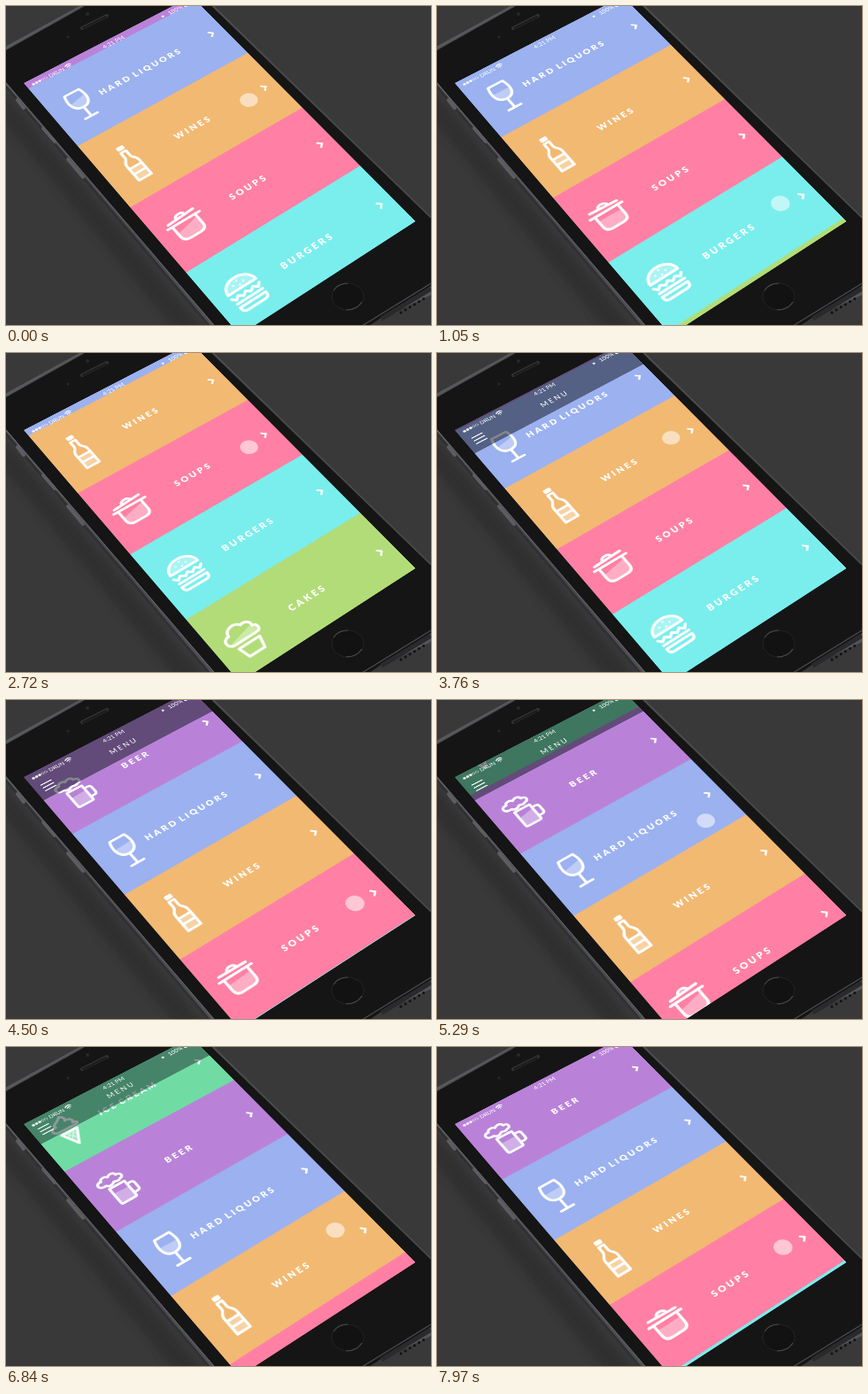
These frames come from a looping animation (480x360 px, 8 s). An HTML page:

```html
<!DOCTYPE html>
<html lang="en">
<head>
<meta charset="utf-8">
<title>Menu scroll</title>
<style>
  html, body { margin: 0; width: 100%; height: 100%; overflow: hidden; background: #393939; }
  #stage { position: relative; width: 480px; height: 360px; overflow: hidden; }
  #stage > svg { position: absolute; left: 0; top: 0; }
  #screen { position: absolute; left: 0; top: 0; width: 320px; height: 568px; transform-origin: 0 0; }
  #screen svg { position: absolute; left: -4px; top: -4px; }
  text { font-family: Lato, "Open Sans", sans-serif; fill: #fff; }
  .label { font-size: 15px; font-weight: 900; letter-spacing: 3.7px; word-spacing: -3px; text-anchor: middle; }
  .line { fill: none; stroke: #fff; stroke-width: 4.4; stroke-linecap: round; stroke-linejoin: round; }
  .tint { fill: #fff; fill-opacity: .35; stroke: none; }
</style>
</head>
<body>
<div id="stage">
  <svg width="480" height="360" viewBox="0 0 480 360">
    <defs>
      <linearGradient id="metal" x1="0" y1="0" x2="1" y2="1">
        <stop offset="0" stop-color="#5b5c60"/><stop offset=".5" stop-color="#48494d"/><stop offset="1" stop-color="#56575b"/>
      </linearGradient>
      <filter id="soft"><feGaussianBlur stdDeviation="5"/></filter>
    </defs>
    <rect width="480" height="360" fill="#393939"/>
    <path d="M-20 78L228 372H196L-20 110Z" fill="#222" opacity=".4" filter="url(#soft)"/>
    <path d="M-10 79L231 364H400L480 326V238L235 0H83L-10 51Z" fill="url(#metal)"/>
    <path d="M-10 75L240 366H402L480 316V239L233 0H88L-10 55Z" fill="#151515"/>
    <path d="M-10 79L234 366" stroke="#2f3033" stroke-width="2.5" fill="none"/>
    <path d="M-10 75L240 366" stroke="#6c6d72" stroke-width="1" fill="none"/>
    <path d="M88 0L-10 55M233 0L480 239M402 361L480 313" stroke="#4a4b4e" stroke-width="1.2" fill="none"/>
    <path d="M13 106L20 115M42 138L55 153M70 173L87 193" stroke="#5c5d62" stroke-width="4" stroke-linecap="round"/>
    <path d="M424 353L480 319" stroke="#2a2a2c" stroke-width="5"/>
    <path d="M446 346L474 329" stroke="#111" stroke-width="3" stroke-linecap="round" stroke-dasharray="0 6"/>
    <path d="M86 25L114 11" stroke="#333335" stroke-width="4" stroke-linecap="round"/>
    <path d="M87 25L113 12" stroke="#1c1c1e" stroke-width="2" stroke-linecap="round"/>
    <circle cx="92" cy="9" r="2" fill="#28282c"/>
    <circle cx="70" cy="35" r="1.5" fill="#29292d"/>
    <ellipse cx="386" cy="328" rx="18" ry="15" fill="#121212" stroke="#242426"/>
    <path d="M370 321Q375 313 386 313M384 343Q396 343 402 334" fill="none" stroke="#4a4a4d" stroke-width="1.2"/>
  </svg>
  <div id="screen"></div>
</div>
<script>
const W = 320, H = 568, ROW = H / 4, LOOP = 8000;
const UP = 720, DOWN = 860;
const screenEl = document.getElementById('screen');

// Perspective matrix that maps the W x H screen onto four stage points.
function project([x0, y0], [x1, y1], [x2, y2], [x3, y3]) {
  const sx = x0 - x1 + x2 - x3, sy = y0 - y1 + y2 - y3;
  const ax = x1 - x2, bx = x3 - x2, ay = y1 - y2, by = y3 - y2;
  const det = ax * by - bx * ay;
  const g = (sx * by - bx * sy) / det, h = (ax * sy - sx * ay) / det;
  const m = [
    (x1 - x0 + g * x1) / W, (y1 - y0 + g * y1) / W, 0, g / W,
    (x3 - x0 + h * x3) / H, (y3 - y0 + h * y3) / H, 0, h / H,
    0, 0, 1, 0, x0, y0, 0, 1
  ];
  return `matrix3d(${m.map(n => n.toFixed(9)).join()})`;
}
screenEl.style.transform = project([20, 87], [209.5, -11], [462.5, 243], [264, 371.5]);

const line = d => `<path class="line" d="${d}"/>`;
const tint = d => `<path class="tint" d="${d}"/>`;

// Outline holding a liquid whose surface tilts.
const vessel = (id, d, level) => `
  <clipPath id="${id}"><path d="${d}"/></clipPath>
  <g clip-path="url(#${id})"><rect class="tint liquid" x="-70" y="${level}" width="140" height="90" data-y="${level}"/></g>
  ${line(d)}`;

const icons = {
  cone: () => line('M-15 -4C-25 -5 -23 -17 -13 -16C-16 -24 -4 -23 2 -32C8 -28 9 -23 6 -20C16 -21 18 -13 14 -10C23 -9 21 -3 15 -4Z') +
    line('M-14 3H14L0 32Z') + tint('M-14 3H14L0 32Z') +
    '<path class="line" style="stroke-width:1.3;opacity:.7" d="M-8 4L5 20M0 4L8 14M8 4L-5 20M0 4L-8 14"/>',
  mug: () => line('M-17 -14C-27 -14 -26 -27 -16 -25C-14 -32 -5 -31 -3 -27C3 -32 10 -30 10 -24C19 -25 19 -14 11 -14C7 -10 3 -14 0 -14C-5 -9 -11 -10 -13 -14Z') +
    vessel('mugClip', 'M-13 -6H14V26Q14 29 11 29H-10Q-13 29 -13 26Z', 6) +
    line('M14 1H20Q25 1 25 6V16Q25 21 20 21H14'),
  glass: () => vessel('glassClip', 'M-13 -28H13C19 -9 15 7 0 7C-15 7 -19 -9 -13 -28Z', -11) + line('M0 7V29M-11 29H11'),
  bottle: () => line('M-4 -35H4V-31H-4Z') + vessel('bottleClip', 'M-4.5 -25H4.5V-13C5 -7 11 -7 11 2V34H-11V2C-11 -7 -5 -7 -4.5 -13Z', 7) +
    line('M-11 8H11M-11 20H11'),
  pot: () => vessel('potClip', 'M-20 -9H20V11Q20 22 9 22H-9Q-20 22 -20 11Z', 1) +
    line('M-28 -9H-20M20 -9H28') +
    `<g class="lid">${line('M-23 -17H23M-8 -18C-7 -25 7 -25 8 -18')}</g>`,
  burger: () => tint('M-24 -8C-23 -34 23 -34 24 -8Z') + line('M-24 -8C-23 -34 23 -34 24 -8Z') +
    '<path class="line" style="stroke-width:3.4" d="M-9 -17h0M0 -22h0M8 -16h0M0 -13h0"/>' +
    line('M-24 0L-19 5L-13 0L-6 5L0 0L6 5L13 0L19 5L24 0M-22 11H22M-22 18H22V20Q22 27 15 27H-15Q-22 27 -22 20Z'),
  cake: () => {
    const top = 'M-19 1C-31 0 -30 -16 -18 -16C-16 -30 2 -31 7 -22C16 -25 22 -18 20 -12C29 -10 27 1 19 1Z';
    return vessel('cakeClip', top, -9) + line('M-18 9H18L13 28H-13Z');
  }
};

const items = [
  ['ICE CREAM', '#70dca4', 'cone'],
  ['BEER', '#b982d8', 'mug'],
  ['HARD LIQUORS', '#9bb1f0', 'glass'],
  ['WINES', '#f2b972', 'bottle'],
  ['SOUPS', '#ff80a4', 'pot'],
  ['BURGERS', '#79eeed', 'burger'],
  ['CAKES', '#b2dc78', 'cake']
];

const MID = ROW / 2 + 4;
const rowMarkup = ([name, color, icon], i) => `
  <g transform="translate(0 ${i * ROW})">
    <rect width="${W}" height="${ROW + 1}" fill="${color}"/>
    <g transform="translate(49 ${MID})">${icons[icon]()}</g>
    <text class="label" x="${W / 2 + 1}" y="${MID + 4}">${name}</text>
    <path class="line" style="stroke-width:3.4;stroke-linecap:butt;stroke-linejoin:miter" d="M294 ${MID - 7}l6 6l-6 6"/>
  </g>`;

const dots = [0, 1, 2, 3, 4].map(i =>
  `<circle cx="${11 + i * 5.6}" cy="11" r="2.1" fill="${i < 3 ? '#fff' : 'none'}" stroke="#fff" stroke-width=".7"/>`).join('');

screenEl.innerHTML = `
<svg width="${W + 8}" height="${H + 8}" viewBox="-4 -4 ${W + 8} ${H + 8}">
  <clipPath id="display"><rect width="${W}" height="${H}"/></clipPath>
  <g clip-path="url(#display)">
    <g id="list">${items.map(rowMarkup).join('')}</g>
    <g id="nav">
      <rect y="-60" width="${W}" height="119" fill="#141923" fill-opacity=".52"/>
      <path class="line" style="stroke-width:2.2;stroke-linecap:butt" d="M12 30h20M12 37h20M12 44h20"/>
      <text x="161.5" y="42" font-size="13" letter-spacing="3" text-anchor="middle">MENU</text>
    </g>
    ${dots}
    <text x="39" y="15" font-size="9.5">DRUN</text>
    <path class="line" style="stroke-width:1.7" d="M70 9q5 -4 10 0M72 12q3 -2.5 6 0M75 14.5h0"/>
    <text x="160" y="14" font-size="10.5" text-anchor="middle">4:21 PM</text>
    <rect x="254" y="8" width="4" height="4" fill="#fff" opacity=".8"/>
    <text x="267" y="14" font-size="10.5">100%</text>
    <rect x="297" y="6.5" width="17" height="8" rx="1.5" fill="#fff"/>
    <circle id="touch" cx="${W * .82}" r="14" fill="#fff"/>
  </g>
</svg>`;

const list = document.getElementById('list');
const nav = document.getElementById('nav');
const touch = document.getElementById('touch');
const liquids = [...document.querySelectorAll('.liquid')];
const lid = document.querySelector('.lid');

// Start time, first row, last row.
const swipes = [
  [-572, 1, 2], [946, 2, 3], [2544, 3, 2], [3683, 2, 1],
  [4957, 1, 0], [6650, 0, 1], [7891, 1, 2]
].map(([start, from, to]) => ({ start, from, to, end: start + (to > from ? UP : DOWN) }));

const clamp = x => Math.max(0, Math.min(1, x));
const ease = x => (1 - Math.cos(Math.PI * clamp(x))) / 2;
const ramp = (t, a, b) => clamp((t - a) / (b - a));

function scrollAt(t) {
  const s = swipes.filter(w => w.start <= t).pop();
  return s.from + (s.to - s.from) * ease((t - s.start) / (s.end - s.start));
}

// Lean while moving, then a damped swing.
function sloshAt(t) {
  let a = 0;
  for (const s of swipes) {
    const dir = s.to - s.from, p = ramp(t, s.start, s.end);
    a += dir * 9 * Math.sin(2 * Math.PI * p);
    if (t > s.end) {
      const k = t - s.end;
      a += dir * 10 * Math.exp(-k / 150) * Math.sin(k * 2 * Math.PI / 330);
    }
  }
  return a;
}

function render(t) {
  const pos = scrollAt(t), tilt = sloshAt(t);
  list.setAttribute('transform', `translate(0 ${-pos * ROW})`);

  for (const l of liquids) l.setAttribute('transform', `rotate(${tilt - 6} 0 ${l.dataset.y})`);
  lid.setAttribute('transform', `rotate(${tilt * .5} 0 -17)`);

  const shown = ease(ramp(t, 2780, 3130)) - ease(ramp(t, 6760, 7100));
  nav.setAttribute('transform', `translate(0 ${-60 * (1 - shown)})`);
  nav.setAttribute('opacity', shown);

  const active = swipes.find(s => t > s.start - 120 && t < s.end + 70);
  touch.setAttribute('opacity', active ? .55 * ramp(t, active.start - 120, active.start - 20) * (1 - ramp(t, active.end, active.end + 70)) : 0);
  if (active) {
    const low = Math.min(active.from, active.to);
    touch.setAttribute('cy', H * (.88 - .515 * (pos - low)));
  }
}

const began = performance.now();
function tick() {
  render((performance.now() - began) % LOOP);
  requestAnimationFrame(tick);
}
tick();
</script>
</body>
</html>
```
